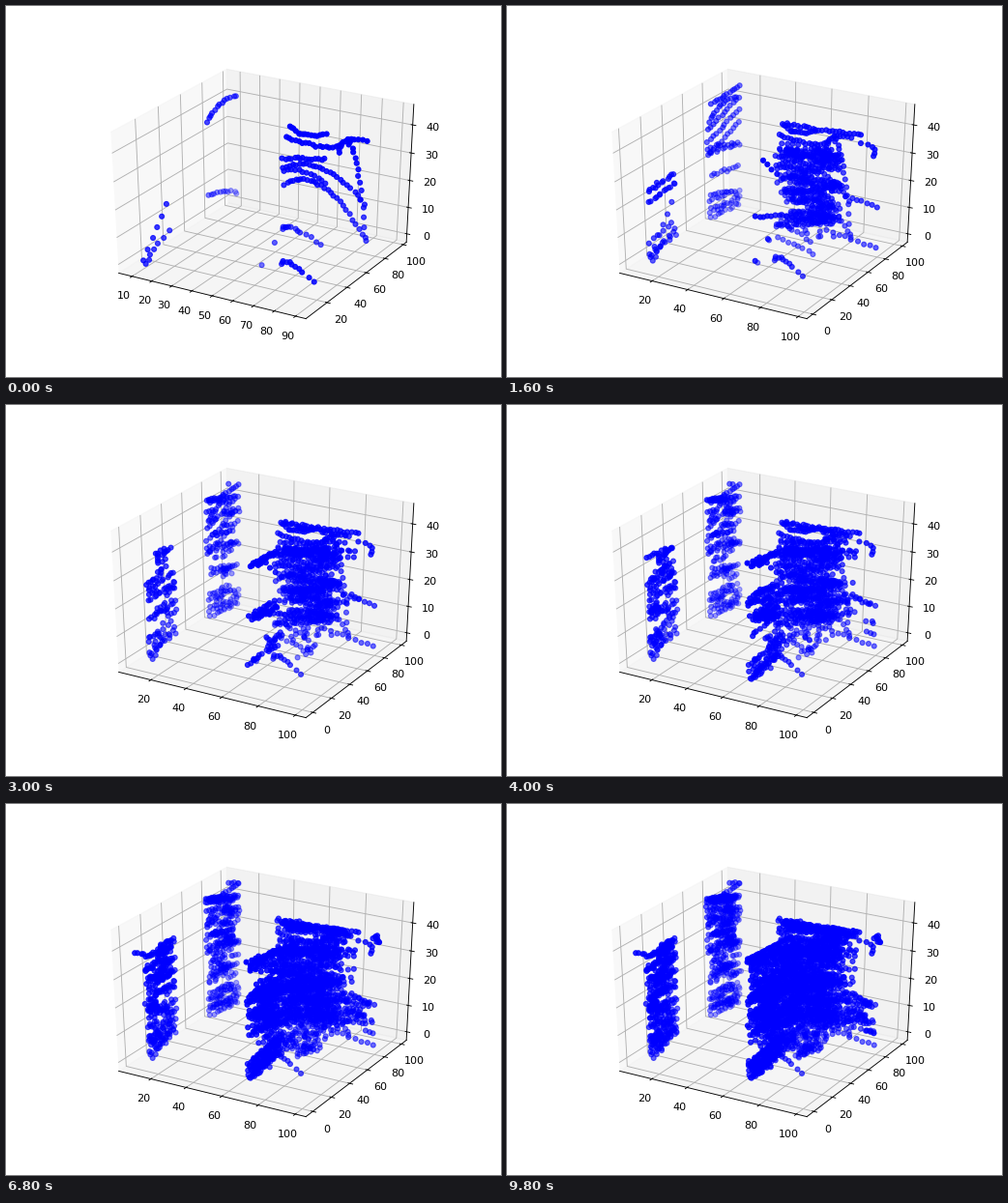
Recreate the animation shown at these times as a matplotlib script. Size 512 px wide and 384 px high, loop 10 s.

```python
import numpy as np
import matplotlib.pyplot as plt
from matplotlib.animation import FuncAnimation

FRAMES, STEP_MS = 50, 200
rng = np.random.default_rng(4)

# (start frame, x extent, y extent, first x tick, x step, first y tick)
VIEWS = [
    (0, (9, 89), (6, 97), 10, 10, 20),
    (1, (8, 98), (1, 99), 20, 20, 0),
    (12, (8, 99), (0, 99), 20, 20, 0),
]
Z_EXTENT = (0, 44)

# Camera basis for elev 30, azim -60, at distance 10
RIGHT = np.array([0.8660, 0.5, 0])
UP = np.array([-0.25, 0.4330, 0.8660])
BACK = np.array([0.4330, -0.75, 0.5])
SX, SY = 396.8 / 0.185, 295.68 / 0.185
OX, OY = 64 + 0.095 * SX, 341.76 - 0.095 * SY

# Wall outlines on screen: top left, top right, bottom right, bottom left
LEFT = [(142, 156), (174, 138), (177, 239), (148, 267)]
FAR = [(205, 96), (241, 93), (241, 206), (210, 221)]
BACK_WALL = [(281, 119), (363, 133), (356, 228), (283, 228)]
FRONT = [(249, 164), (303, 141), (306, 243), (249, 290)]
FRONT_X = 70

cloud, births = [], []


def lift(p, x, view):
    """Cast screen positions back onto the plane with the given x."""
    ext = np.array([view[1], view[2], Z_EXTENT], float)
    mid, span = ext.mean(axis=1), 1.1 * np.ptp(ext, axis=1)
    ray = (np.outer((p[:, 0] - OX) / SX, RIGHT)
           + np.outer((OY - p[:, 1]) / SY, UP) - BACK)
    k = ((x - mid[0]) / span[0] - 10 * BACK[0]) / ray[:, 0]
    return mid + span * (10 * BACK + k[:, None] * ray)


def add(p, born, x=None):
    first = np.max(born) == 0
    if x is None:
        px = p[:, 0]
        right = 56 + 0.38 * (px - 290) if first else 54 + 0.5 * (px - 281)
        x = np.where(px < 246, 13.5, right)
    cloud.append(lift(p, x, VIEWS[0 if first else 2]))
    births.append(np.broadcast_to(born, len(p)))


def curve(a, ctrl, b, n, start=0, end=None, x=None, jitter=0.6):
    """n points along a quadratic curve, appearing from start to end."""
    t = np.linspace(0, 1, n)[:, None]
    a, ctrl, b = map(np.array, (a, ctrl, b))
    p = (1 - t) ** 2 * a + 2 * t * (1 - t) * ctrl + t ** 2 * b
    born = np.linspace(start, start if end is None else end, n).astype(int)
    add(p + rng.normal(0, jitter, p.shape), born, x)


def line(a, b, *args, **kw):
    curve(a, np.add(a, b) / 2, b, *args, **kw)


def scan(quad, start, end, rate, x=None, seg=4, reach=0.25,
         us=(0, 1), vs=(0, 1), bias=1.0):
    """Short scan lines scattered over part of a wall, rate points a frame."""
    tl, tr, br, bl = np.array(quad, float)
    for k in range(start, end):
        for _ in range(rng.poisson(rate / seg)):
            u = rng.uniform(0, 1 - reach) + np.linspace(0, reach, seg)
            u = (us[0] + (us[1] - us[0]) * u)[:, None]
            v = vs[0] + (vs[1] - vs[0]) * rng.uniform() ** bias
            p = (tl + (tr - tl) * u) * (1 - v) + (bl + (br - bl) * u) * v
            add(p + rng.normal(0, 0.9, p.shape), k, x)


def first_sweep():
    curve((145, 267), (150, 254), (169, 232), 7)
    curve((143, 262), (155, 236), (165, 206), 6)
    curve((208, 121), (219, 97), (238, 93), 13)
    curve((210, 196), (224, 189), (239, 193), 11)
    curve((294, 124), (308, 139), (331, 132), 15)
    curve((290, 135), (316, 147), (345, 146), 17)
    curve((345, 151), (345, 133), (374, 140), 12)
    curve((353, 138), (366, 155), (372, 240), 16)
    line((286, 158), (329, 158), 15)
    curve((287, 168), (326, 151), (371, 205), 25)
    curve((288, 185), (326, 160), (372, 243), 28)
    curve((288, 170), (308, 167), (331, 183), 12)
    curve((286, 231), (290, 222), (327, 248), 13)
    line((278, 245), (265, 268), 2)
    curve((285, 268), (290, 258), (318, 286), 11, x=np.linspace(61, 83, 11))


def left_walls():
    scan(LEFT, 1, 9, 6, seg=6, reach=0.8)
    scan(LEFT, 9, 20, 12, bias=1.2)
    scan(LEFT, 20, FRAMES, 10, bias=1.2)
    line((133, 154), (143, 156), 4, 30, 33)
    # Long steep rows first, then filling in
    line((212, 101), (241, 82), 12, 1, 3)
    for i in range(3):
        line((208, 128 + 13 * i), (240, 94 + 13 * i), 12, 1 + i, 3 + i)
    scan(FAR, 1, 9, 10, seg=10, reach=0.9, vs=(0.4, 1))
    scan(FAR, 9, 20, 11, bias=1.1)
    scan(FAR, 20, FRAMES, 8, bias=1.2)
    scan(FAR, 10, 36, 2, vs=(0, 0.05))
    line((231, 82), (241, 82), 4, 14, 30)


def back_wall():
    scan(BACK_WALL, 1, 9, 52, us=(0, 0.82), vs=(0.2, 1))
    curve((288, 122), (320, 128), (365, 133), 24, 1, 6)
    scan(BACK_WALL, 9, FRAMES, 18, bias=1.25)
    scan(BACK_WALL, 14, FRAMES, 2.5, vs=(0, 0.06))
    # Stray returns beyond the wall and below it
    curve((365, 142), (384, 145), (377, 156), 6, 3, 6)
    line((350, 196), (381, 207), 7, 2, 6)
    line((330, 232), (380, 250), 9, 3, 8)
    line((280, 239), (315, 256), 8, 3, 7)
    scan([(350, 192), (381, 207), (381, 238), (348, 232)], 14, FRAMES, 1.8, seg=3)
    scan([(378, 135), (387, 137), (386, 150), (378, 148)], 20, 32, 1, seg=2)
    scan([(285, 228), (345, 228), (325, 252), (300, 264)], 3, FRAMES, 2.5, seg=2)


def front_wall():
    line((264, 158), (278, 174), 4, 2, 5, FRONT_X)
    line((256, 217), (281, 216), 7, 3, 6, FRONT_X)
    line((270, 240), (257, 263), 2, 4, 7, FRONT_X)
    # Scanned in bands, then filled between them
    for start, bands in ((12, (0, 0.43, 0.76)), (16, (0.27, 0.52, 0.88))):
        for v in bands:
            scan(FRONT, start, start + 4, 8, FRONT_X,
                 us=(0, 0.65), vs=(v, v + 0.1))
    scan(FRONT, 16, 28, 14, FRONT_X)
    scan(FRONT, 28, 42, 34, FRONT_X)
    scan(FRONT, 42, FRAMES, 20, FRONT_X)
    line((249, 161), (293, 138), 24, 40, 49, FRONT_X, 0.3)


for build in (first_sweep, left_walls, back_wall, front_wall):
    build()
cloud, births = np.concatenate(cloud), np.concatenate(births)
# The scanner pauses for two frames
births = np.where(np.isin(births, (7, 11)), births + 1, births)

fig = plt.figure(figsize=(6.4, 4.8), dpi=80)
ax = fig.add_subplot(projection="3d")
# Stretch a unit cube over the whole subplot
ax.apply_aspect = lambda position=None: None
ax.set_box_aspect((1, 1, 1), zoom=np.sqrt(3) / 1.8294640721620434)
ax.view_init(30, -60)


def padded(extent):
    mid, half = np.mean(extent), 0.55 * np.ptp(extent) * 25 / 24
    return mid - half, mid + half


def update(k):
    for old in list(ax.collections):
        old.remove()
    dots = ax.scatter(*cloud[births <= k].T, c="b", s=20, marker="o")
    _, xs, ys, x0, dx, y0 = [v for v in VIEWS if v[0] <= k][-1]
    ax.set_xticks(np.arange(x0, 101 if dx == 20 else 91, dx))
    ax.set_yticks(np.arange(y0, 101, 20))
    ax.set_zticks(np.arange(0, 41, 10))
    ax.set_xlim(padded(xs))
    ax.set_ylim(padded(ys))
    ax.set_zlim(padded(Z_EXTENT))
    return [dots]


anim = FuncAnimation(fig, update, frames=FRAMES, interval=STEP_MS,
                     repeat=True, repeat_delay=0, blit=False)
plt.show()
```
